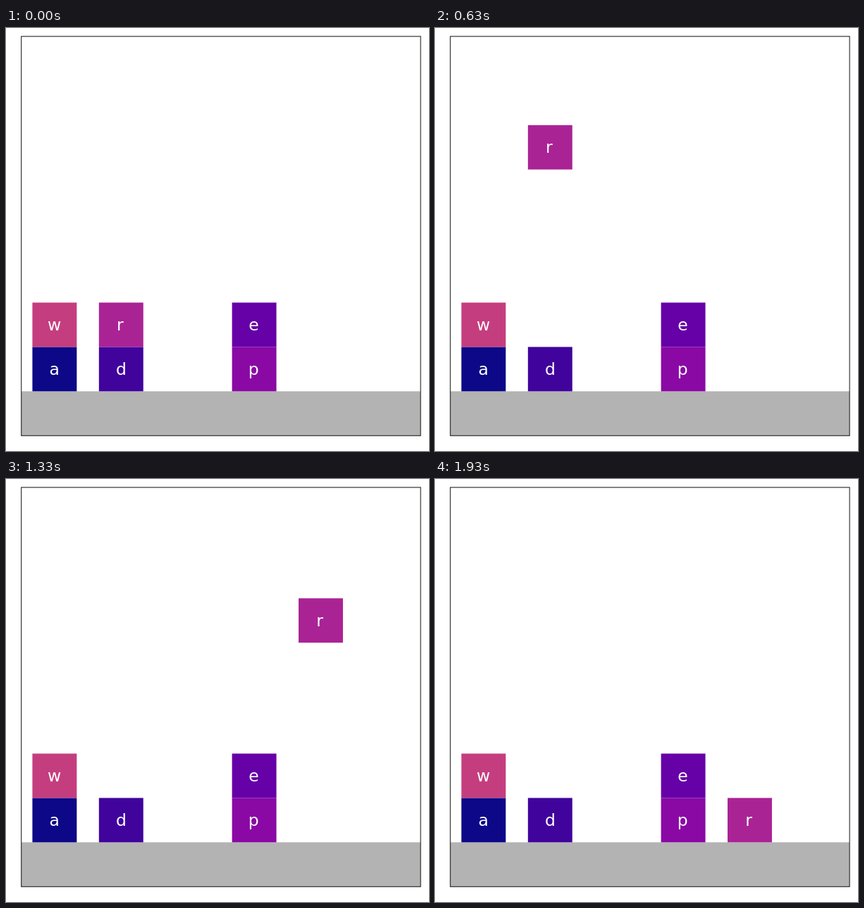
Write an HTML page with a canvas that moves like this. It is 600 px wide and 600 px high and loops after 1.96 s.

```html
<!DOCTYPE html>
<html>
<head>
<meta charset="utf-8">
<style>
  html, body { margin: 0; width: 100%; height: 100%; overflow: hidden; background: #fff; }
  canvas { display: block; }
</style>
</head>
<body>
<canvas id="stage" width="600" height="600"></canvas>
<script>
const ctx = document.getElementById('stage').getContext('2d');
const LOOP = 1960, U = 62.93, LEFT = 21.7, TOP = 11.9, FLOOR = TOP + 8 * U;

// letter, colour, column, level
const blocks = [
  ['a', '#0d0887', 0, 0], ['w', '#c43e7f', 0, 1],
  ['d', '#40049d', 1, 0],
  ['p', '#8a09a5', 3, 0], ['e', '#6600a7', 3, 1]
];

function drawBlock(letter, colour, col, level) {
  const x = LEFT + U * (0.25 + 1.5 * col), y = FLOOR - U * (level + 1);
  ctx.fillStyle = colour;
  ctx.fillRect(x, y, U, U);
  ctx.fillStyle = '#fff';
  const m = ctx.measureText(letter);
  const inkMid = (m.actualBoundingBoxRight - m.actualBoundingBoxLeft) / 2;
  ctx.fillText(letter, x + U / 2 - inkMid - 0.3, y + U / 2 + 8);
}

// 30 ticks per second on a 10 ms grid
function tickAt(ms) {
  const r = ms % 100;
  return 3 * Math.floor(ms / 100) + (r >= 30) + (r >= 70);
}

// Lift for 20 ticks, rest, carry for 10, lower for 20; each move starts one tick late
function moverAt(tick) {
  if (tick < 1) return [1, 1];
  if (tick < 30) return [1, 1 + Math.min(tick + 1, 20) / 5];
  const step = tick - 28;
  return [1 + 3 * Math.min(step / 10, 1), 5 - Math.max(step - 10, 0) / 4];
}

function draw(now) {
  const tick = tickAt(now % LOOP);
  ctx.clearRect(0, 0, 600, 600);
  ctx.font = '23.5px "DejaVu Sans", sans-serif';
  ctx.fillStyle = '#b3b3b3';
  ctx.fillRect(LEFT, FLOOR, 9 * U, U);
  for (const b of blocks) drawBlock(...b);
  drawBlock('r', '#aa2395', ...moverAt(tick));
  ctx.strokeStyle = '#222';
  ctx.lineWidth = 1.1;
  ctx.strokeRect(LEFT, TOP, 9 * U, 9 * U);
}

const start = performance.now();
function loop() {
  draw(performance.now() - start);
  requestAnimationFrame(loop);
}
loop();
</script>
</body>
</html>
```
